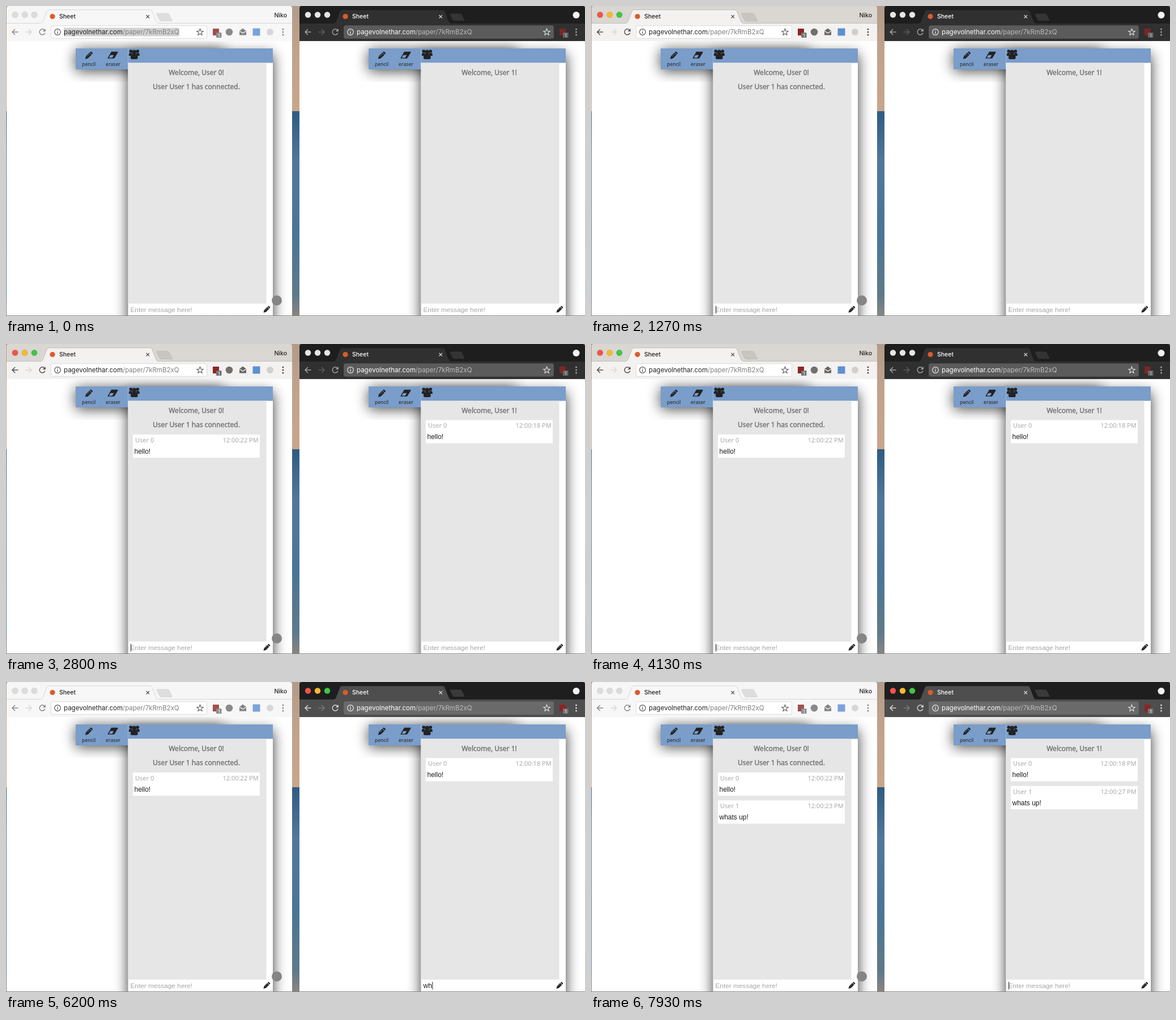
Write an HTML page that moves like this. It is 1022x548 px and loops after 8000 ms.

```html
<!DOCTYPE html>
<html lang="en">
<head>
<meta charset="utf-8">
<title>Shared sheet chat</title>
<style>
html, body { margin: 0; width: 100%; height: 100%; overflow: hidden; background: #fff; }
svg { display: block; }
text { white-space: pre; }
.ui { font-family: Inter, sans-serif; }
.page { font-family: "Noto Sans", "Open Sans", sans-serif; }
.field { font: 12px "Liberation Sans", Arial, sans-serif; fill: #1c1c1c; }
.hint { font-size: 11.8px; fill: #a6a6a6; }
.note { font-size: 12px; fill: #6c6c6c; stroke: #6c6c6c; stroke-width: .3; text-anchor: middle; }
.meta { font-size: 11px; fill: #a9a9a9; }
.tool { font-size: 8.7px; fill: #222; text-anchor: middle; }

.win { --strip: #f6f6f6; --bar: #f7f7f7; --edge: #cfcfcf; --plus: #dedede; --box: #fff; --boxEdge: #d6d6d6;
  --ink: #8a8a8a; --dim: #d8d8d8; --title: #222; --host: #222; --path: #808080; --star: #555;
  --r: #dcdcdc; --y: #dcdcdc; --g: #dcdcdc; --ring: #cdcdcd; }
.win.on { --strip: #dad6d1; --bar: #f3f2f1; --edge: #b5b1ad; --plus: #c9c5c0; --ink: #505050;
  --r: #f0544d; --y: #f5b932; --g: #3fc64b; --ring: #0002; }
.win.dark { --strip: #1e1e1e; --bar: #303030; --edge: #1a1a1a; --plus: #343434; --box: #5b5b5b; --boxEdge: #5b5b5b;
  --ink: #a2a2a2; --dim: #5c5c5c; --title: #fff; --host: #fff; --path: #bdbdbd; --star: #e8e8e8;
  --r: #e6e6e6; --y: #e6e6e6; --g: #e6e6e6; --ring: none; }
.win.dark.on { --bar: #4e4e4e; --plus: #3a3a3a; --box: #6a6a6a; --boxEdge: #6a6a6a; --ink: #d5d5d5; --dim: #787878;
  --r: #f0544d; --y: #f5b932; --g: #3fc64b; }
.strip { fill: var(--strip); }
.bar { fill: var(--bar); }
.tab { fill: var(--bar); stroke: var(--edge); stroke-width: .8; }
.line { fill: none; stroke: var(--ink); stroke-width: 1.5; }
.fill { fill: var(--ink); }
.win:not(.on) .ext { opacity: .8; }
</style>
</head>
<body>
<svg id="stage" width="1022" height="548" viewBox="0 0 1022 548">
  <defs>
    <linearGradient id="sky" x2="0" y2="1">
      <stop stop-color="#b29b8a"/><stop offset=".4" stop-color="#c0a28b"/><stop offset="1" stop-color="#c9a68c"/>
    </linearGradient>
    <linearGradient id="sea" x2="0" y2="1">
      <stop stop-color="#2f5b83"/><stop offset=".25" stop-color="#51789a"/><stop offset=".6" stop-color="#4a7596"/>
      <stop offset=".9" stop-color="#60798b"/><stop offset="1" stop-color="#8a8580"/>
    </linearGradient>
    <filter id="soft" x="-50%" y="-50%" width="200%" height="200%"><feGaussianBlur stdDeviation="12"/></filter>
    <clipPath id="view"><rect x="1" y="62" width="504" height="485"/></clipPath>
    <g id="pencil" fill="#222" transform="rotate(45)">
      <path d="M-2.7-4.6h5.4v9.2L0 9.2l-2.7-4.6z"/><path d="M-2.7-5.6v-1.6q0-1.3 1.3-1.3h2.8q1.3 0 1.3 1.3v1.6z"/>
      <path d="M-.8-3.4v7" stroke="#7a9dca" stroke-width=".7"/>
    </g>
    <g id="eraser">
      <path d="M-2.5-6H8.2q1.6 0 .7 1.5L3.2 5q-.8 1-2 1H-8q-1.7 0-.7-1.5l4.6-7.7z" fill="#222"/>
      <path d="M-4.2 0H1.8L-1 4.8H-7z" fill="#7a9dca"/>
    </g>
    <g id="people" fill="#222">
      <circle cx="-6" cy="-5" r="2.8"/><circle cx="6" cy="-5" r="2.8"/>
      <path d="M-9.5 3v-2q0-3 2.6-3h3v5zM9.5 3v-2q0-3-2.6-3h-3v5z"/>
      <circle cy="-3.4" r="4.2"/><path d="M-6.3 6.5q0-6.5 3.6-6.5h5.4q3.6 0 3.6 6.5 0 2.5-2.3 2.5h-8q-2.3 0-2.3-2.5z"/>
    </g>
  </defs>
  <rect width="1022" height="187" fill="url(#sky)"/>
  <rect y="186" width="1022" height="362" fill="url(#sea)"/>
</svg>
<script>
const LOOP = 8000, BLINK = 500, ROW = 25.5, CARD = 49.4;
const HOST = 'pagevolnethar.com', PATH = '/paper/7kRmB2xQ';
const stage = document.getElementById('stage');

const messages = [
  { user: 'User 0', text: 'hello!', at: 2680, stamps: ['12:00:22 PM', '12:00:18 PM'] },
  { user: 'User 1', text: 'whats up!', at: 7480, stamps: ['12:00:23 PM', '12:00:27 PM'] },
];

const windows = [
  { x: 0, theme: '', boxEnd: 355, menu: 489, notes: ['Welcome, User 0!', 'User User 1 has connected.'],
    focus: [830, 5200], keys: [1700, 1830, 1960, 2080, 2240, 2450] },
  { x: 517, theme: 'dark', boxEnd: 450, menu: 489.5, notes: ['Welcome, User 1!'],
    focus: [5200, LOOP], keys: [5950, 6130, 6330, 6460, 6600, 6770, 6920, 7060, 7230] },
];

const dot = (x, y, r, attrs) => `<circle cx="${x}" cy="${y}" r="${r}" ${attrs}/>`;
const box = (x, y, w, h, attrs) => `<rect x="${x}" y="${y}" width="${w}" height="${h}" ${attrs}/>`;
const use = (id, x, y, scale = 1) => `<use href="#${id}" transform="translate(${x} ${y}) scale(${scale})"/>`;
const label = (x, y, cls, str, attrs = '') => `<text x="${x}" y="${y}" class="${cls}" ${attrs}>${str}</text>`;

function star(cx, cy) {
  const points = Array.from({ length: 10 }, (_, i) => {
    const a = i * Math.PI / 5 - Math.PI / 2, r = i % 2 ? 2.6 : 6;
    return [cx + r * Math.cos(a), cy + r * Math.sin(a)].map(v => v.toFixed(1));
  });
  return `<polygon points="${points.join(' ')}" fill="none" stroke="var(--star)" stroke-width="1.1"/>`;
}

function blocker(x) {
  return box(x - 6, 40, 11, 12, 'fill="#8e2424"') + box(x, 47, 9.5, 9, 'rx="1" fill="#757575"')
    + label(x + 4.8, 54.5, 'ui', '1', 'font-size="8" fill="#fff" text-anchor="middle"');
}

function tabStrip(win) {
  const lights = ['r', 'y', 'g'].map((c, i) =>
    dot(16 + 17 * i, 15.5, 5.2, `fill="var(--${c})" stroke="var(--ring)" stroke-width=".7"`)).join('');
  const owner = win.theme
    ? dot(489.5, 16, 6, 'fill="#f2f2f2"')
    : label(496, 19.5, 'ui', 'Niko', 'font-size="10.5" font-weight="500" fill="#222" text-anchor="end"');
  return `<path class="strip" d="M1 31V4q0-4 4-4h496q4 0 4 4v27z"/>
    ${box(1, 30, 504, 32, 'class="bar"')}${box(1, 30, 504, .8, 'fill="var(--edge)"')}
    <path class="tab" d="M61 30.8q3 0 4-3l7-18q1-3 4-3h178q3 0 4 3l7 18q1 3 4 3"/>
    ${box(62, 30, 206, 1.6, 'class="bar"')}
    <path d="M267 13h18q2 0 3 2l5 10q1 1.500-1 1.500h-18q-2 0-3-2l-5-10q-1-1.500 1-1.500z"
      fill="var(--plus)" stroke="var(--edge)" stroke-width=".7"/>
    ${lights}${dot(82, 18.5, 4.6, 'fill="#dc5b2b"')}
    ${label(94, 22.3, 'ui', 'Sheet', 'font-size="10.5" font-weight="500" fill="var(--title)"')}
    <path d="M247.500 16l5.500 5.500m0-5.500l-5.500 5.500" stroke="var(--title)" stroke-width="1.1" opacity=".8"/>${owner}`;
}

function extensions() {
  return dot(394, 46, 6.3, 'fill="#707070"')
    + `<path d="M412 44l6-4.500 6 4.500v7.500h-12z" fill="#666"/><path d="M412.500 44.500l5.500 3.500 5.500-3.500" fill="none" stroke="#fff" stroke-width="1.3"/>`
    + box(435.5, 39.5, 13, 13, 'fill="#5d8fd3"') + dot(466, 46, 6, 'fill="#d0d0d0"');
}

function toolbar(win) {
  const end = win.boxEnd, menu = [41, 46, 51].map(y => dot(win.menu, y, 1.5, 'class="fill"')).join('');
  return `<path class="line" d="M21.500 46h-10.500m5-5l-5 5 5 5"/>
    <path class="line" d="M34.500 46h10.500m-5-5l5 5-5 5" style="stroke:var(--dim)"/>
    <path class="line" d="M68.300 43a5 5 0 1 0 .6 4.500"/><path class="fill" d="M69.800 40v5h-5z"/>
    ${box(79.5, 34.8, end - 80, 22.4, 'rx="2.5" fill="var(--box)" stroke="var(--boxEdge)" stroke-width=".9"')}
    ${dot(91, 46, 5.3, 'fill="none" stroke="var(--star)" stroke-width="1.2"')}
    <path d="M91 45v4m0-6.500v1.300" stroke="var(--star)" stroke-width="1.3"/>
    ${box(102, 38.5, 204, 15, 'class="selection" fill="#d2d2d2"')}
    <text class="ui" x="102" y="50.3" font-size="11.5" fill="var(--host)">${HOST}<tspan fill="var(--path)">${PATH}</tspan></text>
    ${star(end - 12.5, 46.3)}
    <g class="ext">${blocker(win.theme ? 466 : 371)}${win.theme ? '' : extensions()}</g>${menu}`;
}

function card(msg, win, index) {
  const y = 109 + ROW * win.notes.length + CARD * index;
  return `<g class="card">${box(224, y, 224, 41, 'fill="#fff"')}
    ${label(228, y + 13.8, 'page meta', msg.user)}
    ${label(445.7, y + 13.8, 'page meta', msg.stamps[windows.indexOf(win)], 'text-anchor="end"')}
    ${label(226.5, y + 33.7, 'field', msg.text)}</g>`;
}

function page(win) {
  const notes = win.notes.map((n, i) => label(336, 121.7 + ROW * i, 'page note', n)).join('');
  return `<g clip-path="url(#view)">${box(1, 62, 504, 485, 'fill="#fff"')}
    ${box(123, 78, 262, 37, 'filter="url(#soft)" opacity=".72"')}
    ${box(215.5, 85, 255.5, 510, 'filter="url(#soft)" opacity=".78"')}
    ${box(123, 75, 93, 37, 'fill="#7a9dca"')}
    ${use('pencil', 146, 87.5, .95)}${use('eraser', 188.5, 86.7)}
    ${label(146.2, 105.5, 'page tool', 'pencil')}${label(189, 105.5, 'page tool', 'eraser')}
    ${box(215.5, 75, 255.5, 473, 'fill="#fff"')}${box(215.5, 75, 255.5, 25.5, 'fill="#7a9dca"')}
    ${box(215.5, 100.5, 244, 425.5, 'fill="#e6e6e6"')}
    ${use('people', 226.3, 85)}${notes}${messages.map((m, i) => card(m, win, i)).join('')}
    ${label(219.5, 541, 'field hint', 'Enter message here!')}${label(219.5, 541, 'field typed', '')}
    ${box(220, 530, 1, 13.5, 'class="caret" fill="#222"')}
    ${use('pencil', 460, 536.5, .85)}</g>`;
}

windows.forEach((win, i) => {
  const node = document.createElementNS('http://www.w3.org/2000/svg', 'g');
  node.setAttribute('transform', `translate(${win.x} 0)`);
  node.innerHTML = tabStrip(win) + toolbar(win) + page(win) + (i ? '' : dot(478, 520.5, 9, 'fill="#858585"'));
  stage.append(node);
  win.node = node;
  win.cards = node.querySelectorAll('.card');
  for (const part of ['selection', 'hint', 'typed', 'caret']) win[part] = node.querySelector('.' + part);
  win.message = messages[i];
});

const show = (el, visible) => el.setAttribute('visibility', visible ? 'inherit' : 'hidden');

function render(t) {
  for (const win of windows) {
    const { focus, keys, message } = win;
    const active = t >= focus[0] && t < focus[1];
    const count = t < message.at ? keys.filter(k => k <= t).length : 0;
    const lastInput = Math.max(...[focus[0], ...keys, message.at].filter(k => k <= t));
    win.node.setAttribute('class', `win ${win.theme} ${active ? 'on' : ''}`);
    show(win.selection, !win.theme && t < focus[0]);
    show(win.hint, !count);
    win.typed.textContent = message.text.slice(0, count);
    win.caret.setAttribute('x', 220 + (count ? win.typed.getComputedTextLength() : 0));
    show(win.caret, active && (t - lastInput) % (2 * BLINK) < BLINK);
    win.cards.forEach((el, i) => show(el, t >= messages[i].at));
  }
}

const start = performance.now();
function tick() {
  render((performance.now() - start) % LOOP);
  requestAnimationFrame(tick);
}
tick();
</script>
</body>
</html>
```
